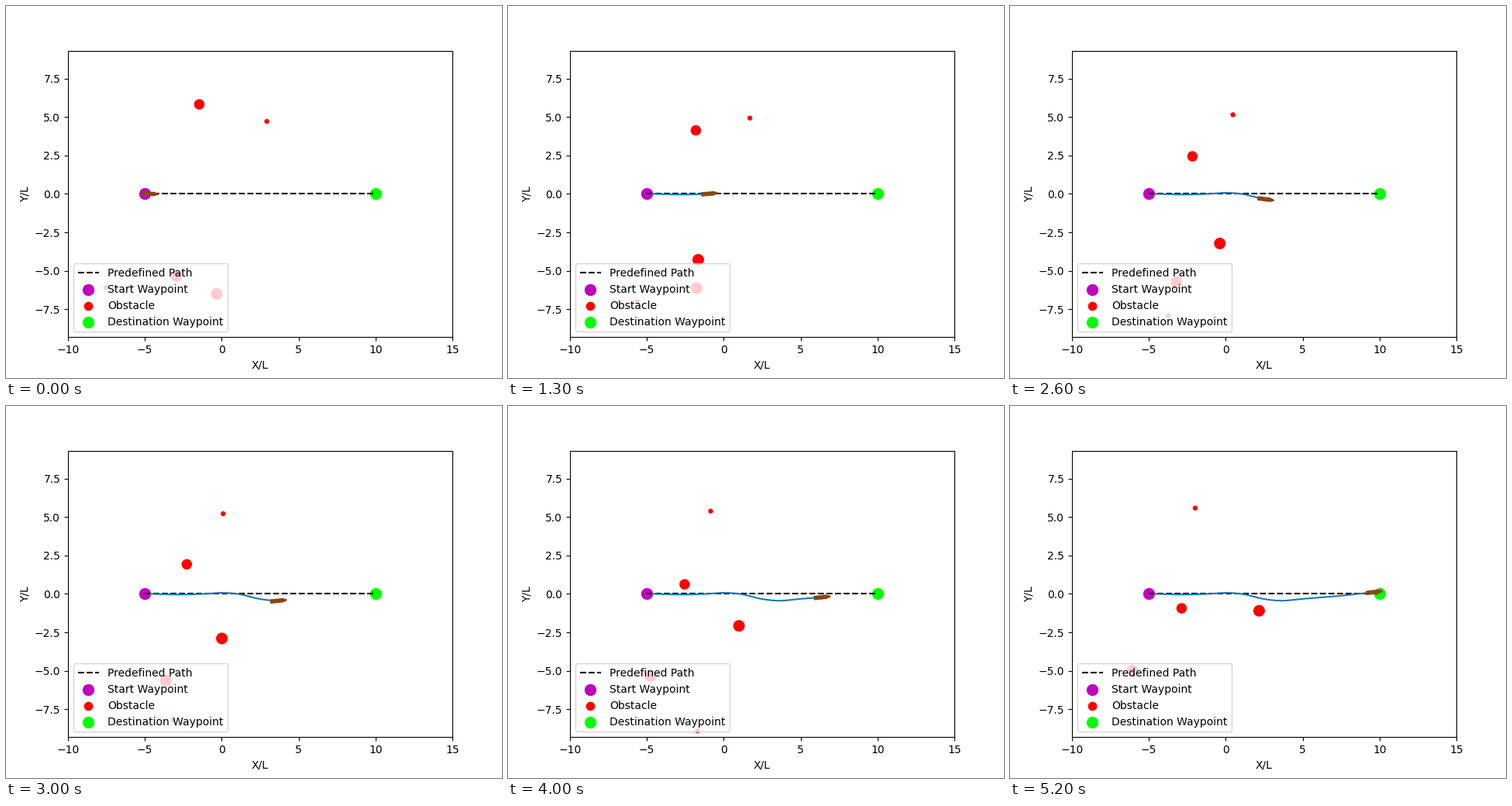
Recreate the animation shown at these times as a matplotlib script. Size 640 by 480 pixels, loop 5.3 s.

```python
import numpy as np
import matplotlib.pyplot as plt
from matplotlib.animation import FuncAnimation

FRAMES, INTERVAL = 53, 100

# Obstacles drift at constant speed from START to END
START = np.array([(-1.46, 5.82), (2.93, 4.71), (-2.94, -5.35),
                  (-0.33, -6.51), (-7.53, -6.10)])
END = np.array([(-2.87, -0.94), (-1.99, 5.58), (2.17, -1.10),
                (-6.08, -4.99), (0.04, -9.75)])
SIZES = [76, 13, 96, 96, 13]

# Turning points of the ship's track
TRACK_X, TRACK_Y = np.array([
    (-4.66, 0), (-2.5, -0.045), (-1.1, 0), (0, 0.07), (1.24, -0.04),
    (2.3, -0.30), (3.5, -0.444), (5, -0.325), (7.2, -0.15), (9.68, 0.12)]).T
SLOPES = np.gradient(TRACK_Y, TRACK_X)

HULL = np.array([(-0.5, -0.09), (0.25, -0.09), (0.52, 0),
                 (0.25, 0.09), (-0.5, 0.09)])


def track_y(x):
    """Cubic Hermite curve through the turning points."""
    i = np.clip(np.searchsorted(TRACK_X, x) - 1, 0, len(TRACK_X) - 2)
    h = TRACK_X[i + 1] - TRACK_X[i]
    u = (x - TRACK_X[i]) / h
    return ((1 + 2 * u) * (1 - u) ** 2 * TRACK_Y[i]
            + u * (1 - u) ** 2 * h * SLOPES[i]
            + u ** 2 * (3 - 2 * u) * TRACK_Y[i + 1]
            + u ** 2 * (u - 1) * h * SLOPES[i + 1])


def ship_x(n):
    """Steady cruise after a slightly faster start."""
    return -4.44 + 0.2713 * n - 0.22 * np.exp(-n / 4)


def hull_at(x):
    # The bow turns ahead of the track and a little more sharply
    y = track_y(x)
    a = np.arctan(1.2 * (track_y(x + 0.8) - y) / 0.8)
    turn = np.array([[np.cos(a), np.sin(a)], [-np.sin(a), np.cos(a)]])
    return HULL @ turn + (x, y)


fig, ax = plt.subplots(figsize=(6.4, 4.8), dpi=100)
ax.set_xlim(-10, 15)
ax.set_ylim(-9.3145, 9.3145)
ax.set_xlabel("X/L")
ax.set_ylabel("Y/L")

ax.plot([-5, 10], [0, 0], "k--", label="Predefined Path")
ax.scatter(-5, 0, s=100, color="m", label="Start Waypoint")
obstacles = ax.scatter(*START.T, s=SIZES, color="red", label="Obstacle")
ax.scatter(10, 0, s=100, color="lime", label="Destination Waypoint")
trail, = ax.plot([], [], color="tab:blue")
ship = ax.fill(*hull_at(ship_x(0)).T, color="saddlebrown", lw=1.5, zorder=3)[0]
ax.legend(loc="lower left")


def update(n):
    obstacles.set_offsets(START + (END - START) * n / (FRAMES - 1))
    x = ship_x(n)
    xs = np.linspace(ship_x(0), x, 200)
    trail.set_data(xs, track_y(xs))
    ship.set_xy(hull_at(x))
    return obstacles, trail, ship


anim = FuncAnimation(fig, update, frames=FRAMES, interval=INTERVAL,
                     repeat=True, repeat_delay=0)
plt.show()
```
